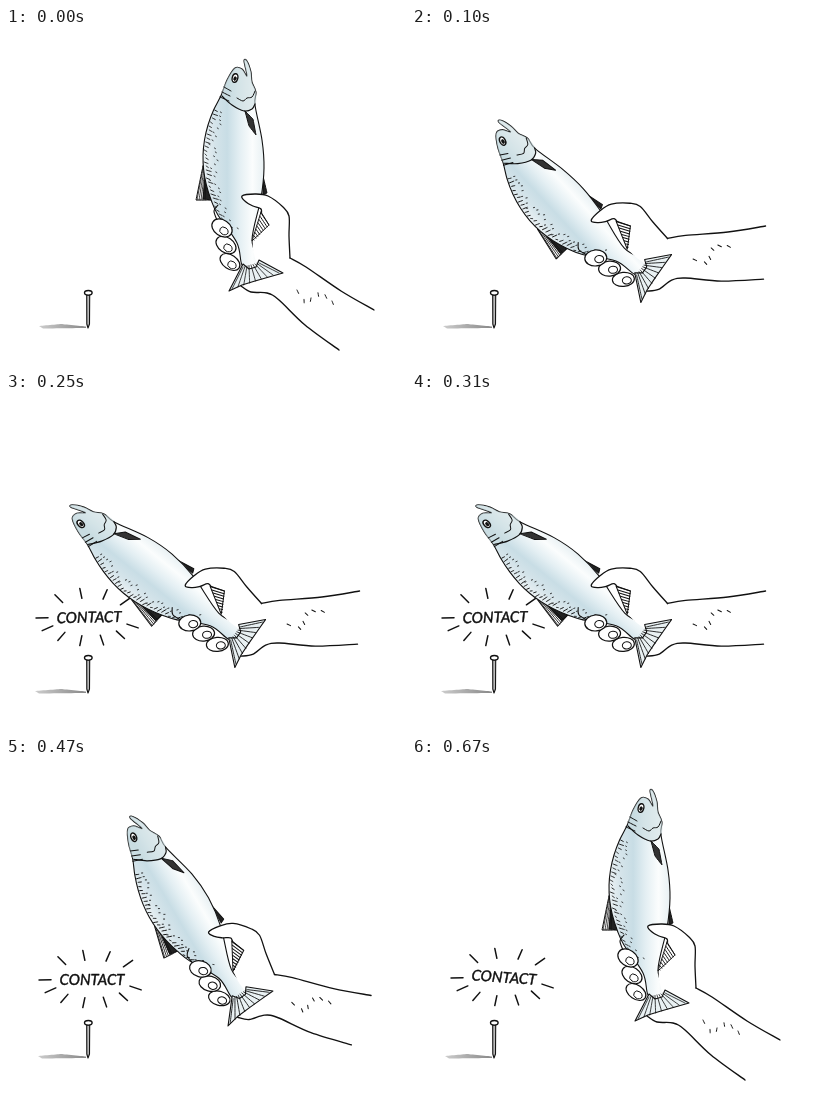
These frames come from a looping animation (400 by 337 pixels, 0.75 s). An HTML page with a canvas:

```html
<!DOCTYPE html>
<html>
<head>
<meta charset="utf-8">
<style>
  html, body { margin: 0; overflow: hidden; background: #fff; }
  canvas { display: block; }
</style>
</head>
<body>
<canvas id="stage" width="400" height="337"></canvas>
<script>
const ctx = document.getElementById('stage').getContext('2d');
const INK = '#111', RAD = Math.PI / 180;

// angle of the arm, wrist position, and how far the fish leans and curls
const UP     = { angle: 0,     x: 284,   y: 230,   lean: 0,   curl: 0 };
const TILTED = { angle: -19.5, x: 268.5, y: 216.5, lean: .06, curl: .0014 };
const SWING  = { angle: -39,   x: 255.5, y: 210.5, lean: .12, curl: -.0006 };
const HIT    = { angle: -69,   x: 267,   y: 222.5, lean: .09, curl: .0014 };
const BOUNCE = { ...SWING, lean: .08, curl: .0014 };

const FRAMES = [
  { end: 50,  pose: UP,     shadow: 33 },
  { end: 100, pose: TILTED, shadow: 29 },
  { end: 150, pose: SWING,  shadow: 31 },
  { end: 250, pose: HIT,    shadow: 33 },
  { end: 350, pose: BOUNCE, shadow: 29, burst: [83, 224, -.02] },
  { end: 550, pose: TILTED, shadow: 32, burst: [86, 221, 0] },
  { end: 750, pose: UP,     shadow: 33, burst: [92, 219, .07] }
];

let pose = UP, seed = 11;
const random = () => (seed = seed * 16807 % 2147483647) / 2147483647;
const still = (x, y) => [x, y];
const belly = y => 197 + 11.5 * ((y - 130) / 50) ** 2;

// curls the part of the fish above the fist around its spine
function bent(x, y) {
  const d = 225 - y;
  if (d <= 0) return [x, y];
  const { lean: a, curl: k } = pose, turn = a + k * d, side = x - 230;
  const drop = (a * a * d + a * k * d * d + k * k * d ** 3 / 3) / 2;
  return [230 - a * d - k * d * d / 2 + side * Math.cos(turn),
          y + drop - side * Math.sin(turn)];
}

function paint(fill, stroke, width) {
  if (fill) { ctx.fillStyle = fill; ctx.fill(); }
  if (stroke) { ctx.strokeStyle = stroke; ctx.lineWidth = width; ctx.stroke(); }
}

// path through a flat list of coordinates; tension 0 gives straight edges
function curve(map, list, { fill, stroke = INK, width = 1.2, closed = false, tension = 1 / 6 } = {}) {
  const p = [];
  for (let i = 0; i < list.length; i += 2) p.push(map(list[i], list[i + 1]));
  const n = p.length;
  const at = i => closed ? p[(i + n) % n] : p[Math.max(0, Math.min(n - 1, i))];
  ctx.beginPath();
  ctx.moveTo(...p[0]);
  for (let i = 0; i < (closed ? n : n - 1); i++) {
    const [a, b, c, d] = [at(i - 1), at(i), at(i + 1), at(i + 2)];
    ctx.bezierCurveTo(b[0] + (c[0] - a[0]) * tension, b[1] + (c[1] - a[1]) * tension,
                      c[0] - (d[0] - b[0]) * tension, c[1] - (d[1] - b[1]) * tension, ...c);
  }
  paint(fill, stroke, width);
}

const line = (map, list, width = 1) => curve(map, list, { width, tension: 0 });
const shape = (map, list, fill, width = 1) => curve(map, list, { fill, width, closed: true, tension: 0 });

// strokes running from edge a-b to edge c-d
function hatch(map, [ax, ay, bx, by], [cx, cy, dx, dy], count, width = .8) {
  for (let i = 0; i < count; i++) {
    const t = i / (count - 1);
    line(map, [ax + (bx - ax) * t, ay + (by - ay) * t, cx + (dx - cx) * t, cy + (dy - cy) * t], width);
  }
}

function ellipse(x, y, rx, ry, turn, fill, width = 1) {
  ctx.beginPath();
  ctx.ellipse(x, y, rx, ry, turn, 0, 7);
  paint(fill, INK, width);
}

function drawScales() {
  seed = 11;
  for (let y = 82; y < 200; y += 4) {
    const x = Math.min(belly(y), 221) + 1 + random() * 2;
    line(bent, [x, y, x + 1 + random() * 4, y + 1.5], .9);
    const dot = x + 3 + random() * 9;
    line(bent, [dot, y + 2, dot + 1, y + 2.6], .9);
  }
}

function drawHead() {
  const jaws = [229, 40, 236, 41, 241, 48, 238, 33, 241, 33, 245, 44, 246, 54, 250, 64, 249, 77];
  curve(bent, [...jaws, 238, 83, 226, 77, 216, 67, 221, 52], { fill: '#c9dcdf88', stroke: null, closed: true });
  curve(bent, [216, 68, 226, 77, 238, 83, 246, 81, 249, 76]);
  curve(bent, [231, 70, 237, 73, 241, 70, 246, 69, 249, 63], { width: 1 });
  for (let i = 0; i < 3; i++) line(bent, [218 - 2 * i, 59 + 5 * i, 225 - i, 63 + 5 * i]);
  const turn = .25 - pose.lean - pose.curl * 175;
  ellipse(...bent(229, 50), 2.8, 4.4, turn, '#fff', 1.4);
  ellipse(...bent(229, 50.6), 1.1, 1.9, turn, INK);
  return jaws;
}

function drawFish() {
  // fins behind the body
  shape(bent, [197, 138, 190, 172, 207, 172, 201, 150], '#fff');
  shape(bent, [199, 148, 197, 171, 207, 172], '#222');
  hatch(bent, [197, 141, 200, 150], [191, 172, 199, 172], 5);
  shape(bent, [257, 148, 261, 165, 257, 167], '#222');

  const skin = ctx.createLinearGradient(...bent(196, 130), ...bent(259, 130));
  ['#eff4f6', '#d5e4ea', '#c8dde5', '#e4eff3', '#fbfdfd', '#e6eff2']
    .forEach((color, i) => skin.addColorStop(i / 5, color));
  const outline = [229, 40, 236, 41, 241, 48, 238, 33, 241, 33, 245, 44, 246, 54, 250, 64,
    249, 77, 256, 112, 258, 140, 255, 170, 246, 212, 254, 235, 245, 241, 236, 237, 231, 215];
  for (let y = 187; y > 50; y -= 15) outline.push(Math.min(belly(y), 221), y);
  curve(bent, outline, { fill: skin, closed: true, width: 1.1 });

  drawHead();
  shape(bent, [239, 83, 247, 91, 250, 107, 243, 98], '#333');
  drawScales();
}

function drawTail() {
  shape(still, [237, 236, 223, 263, 236, 257, 249, 253, 263, 249, 277, 245, 253, 232, 250, 239, 243, 241],
    '#e9f1f3', 1.1);
  hatch(still, [237, 239, 253, 235], [226, 261, 273, 245], 9);
}

function drawHand() {
  const thumb = [255, 188, 255, 181, 247, 178, 240, 174, 236, 168, 249, 166, 262, 168,
    277, 179, 283, 188, 283, 208, 284, 230];
  curve(still, [...thumb, 274, 250, 256, 243, 249, 230, 247, 212], { fill: '#fff', stroke: null, closed: true });
  curve(still, thumb, { width: 1.3 });
  curve(still, [284, 230, 300, 239, 335, 263, 368, 282], { width: 1.4 });
  curve(still, [235, 258, 245, 264, 261, 265, 273, 272, 299, 297, 333, 322], { width: 1.4 });

  shape(still, [255, 184, 263, 197, 246, 213], '#fff');
  hatch(still, [255, 185, 247, 211], [263, 197, 248, 212], 9, 1);
  drawTail();

  curve(still, [212, 177, 208, 183, 211, 192], { width: 1.1 });
  for (let i = 2; i >= 0; i--) {
    const x = 216 + 4 * i, y = 200 + 17 * i;
    ellipse(x, y, 11, 8 - i * .5, .6, '#fff', 1.2);
    ellipse(x + 2, y + 3, 4.5, 3.6, .6, '#fff');
  }

  seed = 5;
  for (let i = 0; i < 6; i++) {
    const x = 291 + 7 * i, y = 262 + random() * 12;
    line(still, [x, y, x + random() * 4 - 1, y + 3.5]);
  }
}

function drawNail(shadow) {
  const shade = ctx.createLinearGradient(shadow, 0, 80, 0);
  shade.addColorStop(0, '#ccc');
  shade.addColorStop(1, '#888');
  curve(still, [shadow, 298, 55, 296, 80, 298.5, 80, 300, shadow + 4, 300.5],
    { fill: shade, stroke: null, closed: true, tension: 0 });
  shape(still, [80.7, 267, 83.7, 267, 83.5, 296, 82, 300, 80.8, 296], '#bbb', 1.1);
  ellipse(82.3, 264.8, 3.8, 2.3, 0, '#fff', 1.4);
}

function drawBurst([x, y, turn]) {
  ctx.save();
  ctx.translate(x, y);
  for (let i = 0; i < 11; i++) {
    // the rays crowd together below the word
    const angle = (i < 7 ? 22 + 26 * i : 20 + 30 * i) * RAD;
    const c = Math.cos(angle), s = Math.sin(angle);
    line(still, [41 * c, 19 * s, 53 * c, 29 * s], 1.5);
  }
  ctx.rotate(turn);
  ctx.font = 'italic 15px Lato, sans-serif';
  ctx.textAlign = 'center';
  ctx.fillStyle = ctx.strokeStyle = INK;
  ctx.lineWidth = .4;
  ctx.fillText('CONTACT', 0, 5.5);
  ctx.strokeText('CONTACT', 0, 5.5);
  ctx.restore();
}

function draw(now) {
  const time = now % 750;
  const frame = FRAMES.find(f => time < f.end);
  pose = frame.pose;
  ctx.fillStyle = '#fff';
  ctx.fillRect(0, 0, 400, 337);
  ctx.lineCap = ctx.lineJoin = 'round';
  drawNail(frame.shadow);
  if (frame.burst) drawBurst(frame.burst);
  ctx.save();
  ctx.translate(pose.x, pose.y);
  ctx.rotate(pose.angle * RAD);
  ctx.translate(-UP.x, -UP.y);
  drawFish();
  drawHand();
  ctx.restore();
}

function tick() {
  draw(performance.now());
  requestAnimationFrame(tick);
}
tick();
</script>
</body>
</html>
```
